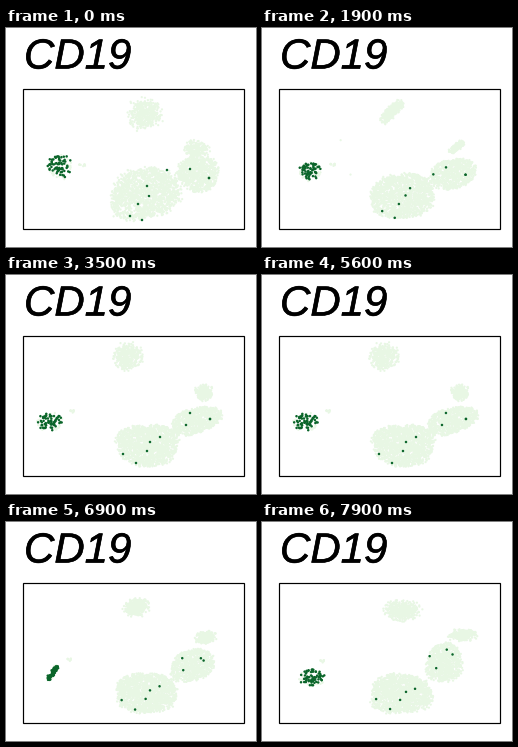
A matplotlib script that plays this animation: 250 px wide and 219 px high, repeating every 8000 ms.

```python
import numpy as np
import matplotlib.pyplot as plt
from matplotlib.animation import FuncAnimation
from matplotlib.patches import Rectangle
from matplotlib.patheffects import withStroke

W, H, DPI = 250, 219, 100
FRAMES, STEP = 80, 100
TWEEN, STARTS = 3300, (200, 5300)
PX = 72 / DPI
LIGHT, DARK = "#e8f7e4", "#0a652a"
rng = np.random.default_rng(19)


def disc(n):
    return np.sqrt(rng.random(n)), rng.uniform(0, 2 * np.pi, n)


def polar(r, a):
    return np.column_stack([r * np.cos(a), r * np.sin(a)])


def blob(n, *layouts, turns=(0, 0, 0), flips=(1, 1, 1), loose=0.1, power=2):
    """Cells in one blob per layout (cx, cy, rx, ry, slope).

    Turns and flips make the blob rotate or fold over between layouts;
    loose is the share of each cell's place that is drawn anew.
    """
    rho, angle = disc(n)
    result = []
    for (cx, cy, rx, ry, slope), turn, flip in zip(layouts, turns, flips):
        a = flip * angle + np.radians(turn)
        edge = (abs(np.cos(a)) ** power + abs(np.sin(a)) ** power) ** (-1 / power)
        edge *= 1 + 0.06 * np.sin(3 * a + cx)
        x, y = ((1 - loose) * polar(rho * edge, a) + loose * polar(*disc(n))).T
        result.append(np.column_stack([cx + rx * x, cy + ry * y + slope * rx * x]))
    return np.array(result)


def island(n):
    return blob(n, (54, 138, 14, 14.5, 0), (44, 147, 15.5, 10.5, 0), (50, 156, 16, 10.5, 0),
                turns=(0, 55, -191), flips=(1, 1, -1), loose=0.2)


body = blob(1500, (139, 166, 37, 27, -0.12), (141.5, 170, 32.5, 22, 0), (139, 172, 32.5, 20.5, 0),
            turns=(0, 15, 15), power=2.7)
wing = blob(800, (192, 146, 22, 19, 0), (190, 146, 27, 14, -0.25), (182, 141, 19, 21, -0.1),
            power=2.3)
lobe = blob(230, (190, 121, 15, 11, 0), (198, 118, 11, 10, 0), (201, 113, 18, 7, 0),
            turns=(0, -90, -60), flips=(1, -1, -1), loose=0.35)
top = blob(420, (139, 86, 20, 19, 0), (122, 81, 18, 16, 0), (141, 89, 22, 13, 0),
           turns=(0, -94, -10), flips=(1, -1, -1), loose=0.35)
speck = blob(9, (76, 137, 5, 2, 0), (66, 136, 3, 2, 0), (60, 139, 3, 2, 0))

# Two stray cells cross over to the island.
strays = island(2)
strays[0] = [(125, 75), (148, 153)]

# Key points of the lone dark cells, one row per layout.
singles = np.array([
    [(161, 142), (184, 141), (203, 150), (203, 150), (141, 158),
     (143, 168), (132, 176), (124, 188), (136, 192)],
    [(180, 150), (184, 138), (204, 144), (204, 144), (154, 162),
     (144, 167), (141, 176), (117, 179), (130, 188)],
    [(174, 146), (167, 134), (184, 127), (190, 132), (153, 167),
     (144, 170), (138, 178), (114, 177), (128, 187)],
], float)

light = np.concatenate([body, wing, lobe, top, island(45), speck, strays], axis=1)
dark = np.concatenate([island(66), singles], axis=1)
layouts = np.concatenate([light, dark], axis=1)
counts = [light.shape[1], dark.shape[1]]


def ease(t):
    t = min(max(t, 0), 1)
    return 4 * t ** 3 if t < 0.5 else 1 - 4 * (1 - t) ** 3


def positions(frame):
    p = layouts[0]
    for start, step in zip(STARTS, np.diff(layouts, axis=0)):
        p = p + step * ease((frame * STEP - start) / TWEEN)
    return p


fig = plt.figure(figsize=(W / DPI, H / DPI), dpi=DPI, facecolor="white")
ax = fig.add_axes([0, 0, 1, 1])
ax.set(xlim=(0, W), ylim=(H, 0))
ax.axis("off")

ax.text(18, 40.5, "CD19", family="Liberation Sans", style="italic",
        size=42 * PX, color="black", va="baseline",
        path_effects=[withStroke(linewidth=0.6 * PX, foreground="black")])
ax.add_patch(Rectangle((16.5, 60.5), 221, 140, fill=False, ec="black", lw=1.2 * PX))

sizes = np.repeat([(2.2 * PX) ** 2, (2.5 * PX) ** 2], counts)
colors = np.repeat([LIGHT, DARK], counts)
dots = ax.scatter(*positions(0).T, s=sizes, c=colors, linewidths=0)


def update(frame):
    dots.set_offsets(positions(frame))
    return dots,


anim = FuncAnimation(fig, update, frames=FRAMES, interval=STEP,
                     repeat=True, repeat_delay=0, blit=False)
plt.show()
```
